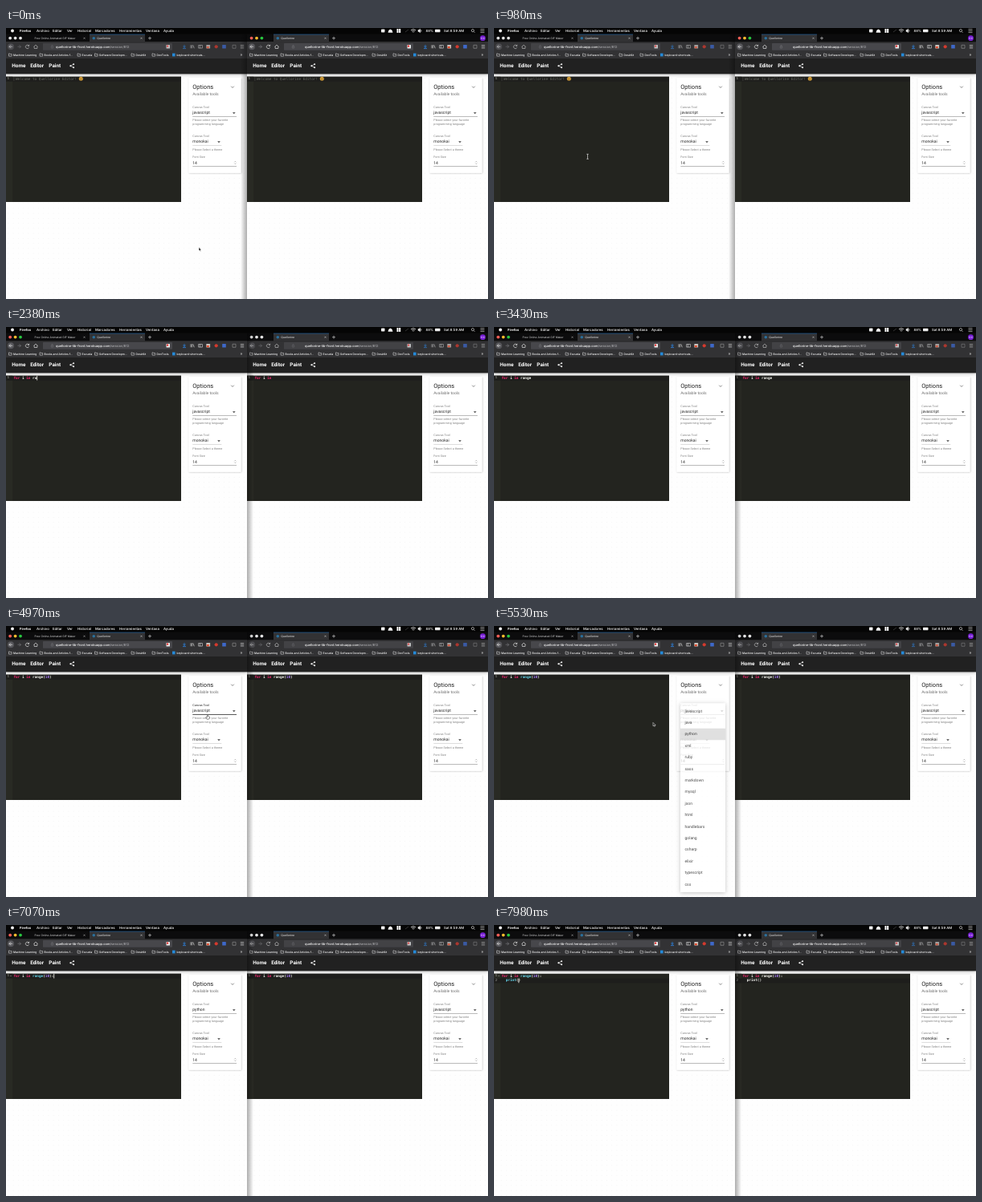
Write an HTML page with a canvas that moves like this. It is 600 px wide and 338 px high and loops after 8000 ms.

```html
<!DOCTYPE html>
<html lang="en">
<head>
<meta charset="utf-8">
<title>Shared editor</title>
<style>
html, body { margin: 0; width: 100%; height: 100%; overflow: hidden; background: #fff; }
canvas { display: block; width: 600px; height: 338px; }
</style>
</head>
<body>
<canvas id="stage" width="600" height="338"></canvas>
<script>
const ctx = document.getElementById("stage").getContext("2d");
const LOOP = 8000, LINE = 5.95, COL = 2.63, CODE_X = 9.4;
const UI = "Inter, sans-serif", APP = "Roboto, sans-serif", MONO = "'DejaVu Sans Mono', monospace";
const ACTIVATE = 1050, BLUR = 4950, REFOCUS = 5850, PICK = 5450, MENU_IN = 5000, MENU_OUT = 5470;
const LANGS = "javascript java python xml ruby sass markdown mysql json html handlebars golang csharp elixir typescript css".split(" ");

// Editor contents over time; "|" marks the caret.
const keys = [[0, "|"]];
const type = (start, step, before, word) =>
  [...word].forEach((c, i) => keys.push([start + step * i, before + word.slice(0, i + 1) + "|"]));
const loopLine = "for i in range";
type(1750, 63, "", loopLine);
keys.push([3710, loopLine + "(|)"], [3780, loopLine + "(1|)"], [3850, loopLine + "(10|)"], [3920, loopLine + "(10)|"],
  [6230, loopLine + "(10)\n|"], [6790, loopLine + "(10)|"], [7070, loopLine + "(10):|"], [7210, loopLine + "(10):\n  |"]);
type(7350, 70, loopLine + "(10):\n  ", "print");
keys.push([7840, loopLine + "(10):\n  print(|)"]);

// Pointer path: time, x, y
const path = [[770, 240, 273.6], [1050, 94, 140], [4130, 94, 140], [4830, 251, 112], [5110, 251, 112],
  [5320, 246, 135], [5390, 246, 135], [5530, 198, 120.4], [5810, 90, 95], [5880, 62, 68]];

const clamp = v => Math.max(0, Math.min(1, v));
const lastAt = (list, t) => list.filter(k => k[0] <= t).pop() || list[0];

function text(s, x, y, size, color = "#fff", weight = 400, font = UI) {
  ctx.font = `${weight} ${size}px ${font}`;
  ctx.fillStyle = color;
  ctx.fillText(s, x, y);
}
function rect(x, y, w, h, color, r = 0) {
  ctx.fillStyle = color;
  ctx.beginPath();
  ctx.roundRect(x, y, w, h, r);
  ctx.fill();
}
function dot(x, y, r, color) {
  ctx.fillStyle = color;
  ctx.beginPath();
  ctx.arc(x, y, r, 0, 7);
  ctx.fill();
}
function trace(d, x, y, color, width = 0.6, fill) {
  const p = new Path2D(d);
  ctx.save();
  ctx.translate(x, y);
  if (fill) { ctx.fillStyle = fill; ctx.fill(p); }
  ctx.strokeStyle = color;
  ctx.lineWidth = width;
  if (width) ctx.stroke(p);
  ctx.restore();
}
// Box whose shadow falls only outside it, so it can be translucent.
function paper(x, y, w, h, blur, color = "#fff") {
  ctx.save();
  ctx.beginPath();
  ctx.rect(0, 0, 600, 338);
  ctx.rect(x, y, w, h);
  ctx.clip("evenodd");
  ctx.shadowColor = "rgba(0,0,0,.3)";
  ctx.shadowBlur = blur;
  ctx.shadowOffsetY = 0.6;
  rect(x, y, w, h, color);
  ctx.restore();
  rect(x, y, w, h, color);
}

function menuBar() {
  rect(0, 0, 600, 7.5, "#050505");
  dot(8, 3.4, 2, "#eee");
  text("Firefox", 17, 3.6, 4.2, "#fff", 700);
  [["Archivo", 38], ["Editar", 58], ["Ver", 76], ["Historial", 89], ["Marcadores", 111],
    ["Herramientas", 141], ["Ventana", 174], ["Ayuda", 196]].forEach(([s, x]) => text(s, x, 3.6, 4.3, "#fff", 500));
  rect(467, 1.5, 4.5, 4, "#eee", 0.8);
  trace("M-3 2L-2-1 0-2.2 2-1 3 2Z", 478.5, 3.8, "#fff", 0, "#fff");
  rect(486.5, 1, 2, 5, "#fff");
  rect(489.2, 1, 2, 5, "#fff");
  trace("M-2 1L2-2", 499, 4, "#555");
  trace("M-3-1Q0-3.6 3-1M-1.7.4Q0-1 1.7.4M-.4 1.6H.4", 507, 3.8, "#eee", 0.8);
  trace("M-2-1H-1L.5-2.3V2.3L-1 1H-2ZM1.6-1.3Q2.6 0 1.6 1.3", 515, 3.5, "#eee", 0.5, "#eee");
  text("88%", 522.5, 3.6, 4.2, "#fff", 500);
  rect(534, 1.8, 6.5, 3.4, "#eee", 0.6);
  text("Sat 8:59 AM", 545, 3.6, 4.3, "#fff", 500);
  trace("M1.3 1.3L2.6 2.6M1.6 0A1.6 1.6 0 1 1-1.6 0A1.6 1.6 0 1 1 1.6 0", 581, 3.2, "#eee", 0.6);
  trace("M-2.5-2H2.5M-2.5 0H2.5M-2.5 2H2.5", 593, 3.6, "#eee");
}

function tabBar(right, active) {
  rect(0, 7, 300, 10.5, "#0c0c0d");
  ["#ff5f57", "#febc2e", "#28c840"].forEach((c, i) => dot((right ? 5.6 : 5.2) + 6.4 * i, 12.6, 1.9, active ? c : "#e4e4e4"));
  const tab = right ? 33 : 104;
  if (!right) {
    text("Free Online Animated GIF Maker", 35.5, 12.7, 3.35, "#d8d8d8");
    trace("M-1-1L1 1M1-1L-1 1", 97.5, 12.7, "#ccc", 0.5);
  }
  rect(tab, 8, 69, 9.5, "#323234");
  rect(tab, 7.5, 69, 0.7, "#1b70c4");
  dot(tab + 5.3, 12.8, 1.8, "#2a6f9c");
  text("Quellorine", tab + 9.2, 12.7, 3.5, "#eee");
  trace("M-1-1L1 1M1-1L-1 1", tab + 64.5, 12.7, "#ddd", 0.5);
  trace("M-2 0H2M0-2V2", tab + 75, 12.7, "#ddd", 0.6);
  if (right) {
    dot(293.5, 12.7, 3.4, "#7a21d6");
    dot(292.2, 12.7, 0.8, "#d9c2f5");
    dot(294.8, 12.7, 0.8, "#d9c2f5");
  }
}

function toolbar(right, active) {
  rect(0, 17.5, 300, 20.5, "#323234");
  ctx.globalAlpha = active ? 1 : 0.75;
  dot(6, 23.3, 4, "#56565a");
  trace("M2 0H-2M0-2L-2 0 0 2", 6, 23.3, "#eee", 0.7);
  trace("M-2 0H2M0-2L2 0 0 2", 16.5, 23.3, "#77777b", 0.7);
  trace("M1.8-1.2A2.2 2.2 0 1 0 2.1 1M2.2-2.6V-.8H.4", 26.5, 23.3, "#ddd", 0.7);
  trace("M-2.6.2L0-2.2 2.6.2M-1.8 0V2.2H1.8V0", 37, 23.3, "#ddd", 0.7);
  rect(46, 18.9, 161, 8.8, "#47474b", 0.8);
  trace("M-1.2-.2H1.2V1.8H-1.2ZM-.8-.2V-1A.8.8 0 0 1 .8-1V-.2", 57.5, 23.3, "#77777b", 0.5);
  rect(199.5, 21, 4.5, 4.5, "#eee", 0.5);
  rect(200, 21.5, 2.2, 2.2, "#d33");
  trace("M0-2.3V1M-1.6-.5L0 1 1.6-.5M-2 2.3H2", 222, 23.3, "#2d93ff", 0.7);
  trace("M-2-2V2M-.6-2V2M.8-2L2.2 2", 232, 23.3, "#ddd", 0.7);
  trace("M-2.4-1.8H2.4V1.8H-2.4ZM-.6-1.8V1.8", 242, 23.3, "#ddd", 0.6);
  rect(249.3, 21, 4.8, 4.6, "#c9c2bd", 0.5);
  rect(249.8, 23, 3, 2.2, "#e04a2c");
  dot(261.7, 23.3, 2.1, "#d43a2e");
  rect(269.2, 21, 4.6, 4.6, "#3e68c9", 0.5);
  trace("M-2-2H2V2H-2Z", 284, 23.3, "#999", 0.6);
  trace("M-2.2-1.8H2.2M-2.2 0H2.2M-2.2 1.8H2.2", 294, 23.3, "#ddd", 0.6);
  ctx.globalAlpha = 1;

  const host = "quellorine-lib-front.herokuapp.com", urlX = right ? 72 : 62;
  text(host, urlX, 23.5, 4, "#fff", 500);
  text("/session/B12", urlX + ctx.measureText(host).width, 23.5, 4, "#b5b5b8");

  [["Machine Learning", 3.5], ["Books and Articles f...", 42], ["Escuela", 89], ["Software Developm...", 110.5],
    ["DeskKit", 156], ["DevTools", 182], ["keyboard-shortcuts...", 207]].forEach(([s, x], i) => {
    if (i === 6) rect(x, 31.6, 3.6, 3.8, "#2489d8");
    else trace("M0 0H1.3L1.8.6H3.6V3.2H0Z", x, 31.9, "#eee", 0.5);
    text(s, x + 5.6, 33.6, 3.4, "#fff", 500);
  });
  text("»", 291.5, 33.3, 5, "#ddd");
}

function page() {
  rect(0, 38, 300, 300, "#fefefe");
  for (let x = 2.5; x < 300; x += 6.25)
    for (let y = 62; y < 338; y += 6.25) rect(x, y, 0.8, 0.8, "#efefef");
  paper(0, 37.5, 300, 19.8, 4, "#212121");
  [["Home", 7.3], ["Editor", 30.2], ["Paint", 53.3]].forEach(([s, x]) => text(s, x, 47.4, 6.4, "#fff", 700, APP));
  trace("M1.9-2L-1.9 0 1.9 2", 82.2, 47.3, "#fff", 0.6);
  [[1.9, -2], [-1.9, 0], [1.9, 2]].forEach(([x, y]) => dot(82.2 + x, 47.3 + y, 1, "#fff"));
}

function editor(content, python, focused, caretOn) {
  const lines = content.replace("|", "").split("\n");
  const before = content.split("|")[0].split("\n");
  const row = before.length - 1, top = 60.7;
  rect(0, top, 218, 156.25, "#23241f");
  rect(0, top, 8.2, 156.25, "#292a24");
  rect(0, top + row * LINE, 218, LINE, "#1e1e1c");
  lines.forEach((line, i) => {
    const y = top + (i + 0.45) * LINE;
    text(i + 1, 1.4, y, 4.2, "#a0a19a", 400, MONO);
    if (python && line.endsWith(":")) trace("M-1-.5H1L0 .8Z", 6, y, "#777", 0, "#8f908a");
    for (const m of line.matchAll(/[a-z]+|\d+|\S/g)) {
      const w = m[0];
      const color = /^(for|in)$/.test(w) ? "#f92672" : /\d/.test(w) ? "#ae81ff"
        : python && /^(range|print)$/.test(w) ? "#66d9ef" : "#f8f8f2";
      text(w, CODE_X + m.index * COL, y, 4.375, color, 700, MONO);
    }
  });
  if (!lines.join("")) {
    text("Welcome to Quellorine Editor!", 12, 63.4, 4.375, "#6b6c65", 400, MONO);
    rect(9.7, 61.3, 0.5, 4.6, "#5a5b55");
    dot(93.3, 63.2, 2.5, "#dba63c");
    dot(92.3, 62.5, 0.45, "#5b3a12");
    dot(94.3, 62.5, 0.45, "#5b3a12");
    trace("M-1.4 0Q0 1.8 1.4 0", 93.3, 63.8, "#7a4a16", 0.6);
  }
  if (focused && caretOn) rect(CODE_X + before[row].length * COL, top + row * LINE + 0.1, 0.8, 5.6, "#f8f8f0");
}

function card(language, hover, focus) {
  const label = (s, y, c = "#808080") => text(s, 232.3, y, 3.75, c, 400, APP);
  const value = (s, y) => text(s, 232.3, y, 5, "#222", 400, APP);
  const arrow = (x, y) => trace("M-1.8-.9H1.8L0 1Z", x, y, "#444", 0, "#444");
  paper(227.5, 62, 65, 118.7, 2);
  text("Options", 232.2, 73.5, 7.5, "#222", 400, APP);
  trace("M-1.8-.9L0 .9 1.8-.9", 282, 73.6, "#555", 0.7);
  text("Available tools", 232.2, 82.3, 5, "#707070", 400, APP);
  label("Canvas Tool", 98.9, focus ? "#222" : undefined);
  value(language, 106);
  arrow(283.8, 106.2);
  rect(232.3, 110, 54.7, hover || focus ? 0.8 : 0.4, hover || focus ? "#222" : "#777");
  label("Please select your favorite", 115);
  label("programming language", 119.4);
  label("Canvas Tool", 134.7);
  value("monokai", 142);
  arrow(265, 142.2);
  rect(232.3, 146.4, 36, 0.4, "#777");
  label("Please Select a theme", 151.6);
  label("Font Size", 160.9);
  value("14", 168.2);
  trace("M-.9-.7L0-1.7 .9-.7M-.9.7L0 1.7 .9.7", 285.3, 168, "#777", 0.5);
  rect(232.3, 172.6, 54.7, 0.4, "#777");
}

function languageMenu(alpha, selected, pointer) {
  if (!alpha) return;
  ctx.globalAlpha = alpha;
  paper(232, 96.5, 56, 235.5, 5);
  LANGS.forEach((name, i) => {
    const y = 106.2 + 14.4 * i;
    const over = pointer.x > 232 && Math.abs(pointer.y - y) < 7.2;
    if (name === selected || over) rect(232, y - 7.2, 56, 14.4, name === selected ? "#d6d6d6" : "#ededed");
    text(name, 237.5, y, 5, "#111", 400, APP);
  });
  ctx.globalAlpha = 1;
}

function pointerAt(t) {
  const next = path.findIndex(p => p[0] > t);
  const i = next < 0 ? path.length - 1 : next;
  const b = path[i], a = path[Math.max(0, i - 1)];
  const u = clamp((t - a[0]) / (b[0] - a[0] || 1)), k = u * u * (3 - 2 * u);
  return { x: a[1] + (b[1] - a[1]) * k, y: a[2] + (b[2] - a[2]) * k };
}

function drawPointer({ x, y }, menuOpen) {
  if (x > 227 && y < 181) {
    trace("M-.6-2.5Q0-3.2.5-2.5V-.5L2.3.2V2L1.5 3.2H-1L-2.2.8-1.6.3-.6 1Z", x, y + 1, "#222", 0.5, "#fff");
  } else if (x < 218 && y < 216 && !menuOpen) {
    trace("M-1.2-3H1.2M0-3V3M-1.2 3H1.2", x + 0.3, y, "#ddd", 0.7);
  } else {
    trace("M0 0V4.4L1 3.5 1.8 5 2.5 4.6 1.8 3.2H3.2Z", x, y, "#fff", 0.5, "#111");
  }
}

function windowShadow(leftActive) {
  const g = ctx.createLinearGradient(300, 0, leftActive ? 308 : 292, 0);
  g.addColorStop(0, "rgba(0,0,0,.32)");
  g.addColorStop(1, "rgba(0,0,0,0)");
  ctx.fillStyle = g;
  ctx.fillRect(leftActive ? 300 : 292, 8, 8, 330);
}

function draw(t) {
  const leftActive = t >= ACTIVATE;
  const focused = leftActive && (t < BLUR || t >= REFOCUS);
  const [keyTime, content] = lastAt(keys, t);
  const since = t - Math.max(keyTime, t >= REFOCUS ? REFOCUS : ACTIVATE);
  const pointer = pointerAt(t);
  const menuAlpha = clamp(Math.min((t - MENU_IN) / 200, 1 - (t - MENU_OUT) / 250));
  const language = t >= PICK ? "python" : "javascript";

  ctx.textBaseline = "middle";
  ctx.textRendering = "geometricPrecision";
  for (const right of [false, true]) {
    ctx.save();
    ctx.translate(right ? 300 : 0, 0);
    ctx.beginPath();
    ctx.rect(0, 0, 300, 338);
    ctx.clip();
    page();
    tabBar(right, right !== leftActive);
    toolbar(right, right !== leftActive);
    if (right) {
      editor(lastAt(keys, t - 70)[1], false, false, false);
      card("javascript", false, false);
    } else {
      const hover = pointer.x > 232 && pointer.y < 114 && t < PICK;
      editor(content, t >= PICK, focused, since % 1000 < 500);
      card(language, hover, t >= BLUR && t < MENU_OUT);
    }
    ctx.restore();
  }
  windowShadow(leftActive);
  menuBar();
  languageMenu(menuAlpha, language, pointer);
  if (t < 1750 || (t >= 4130 && t < 6160)) drawPointer(pointer, menuAlpha > 0);
}

const start = performance.now();
function tick() {
  draw((performance.now() - start) % LOOP);
  requestAnimationFrame(tick);
}
tick();
</script>
</body>
</html>
```
